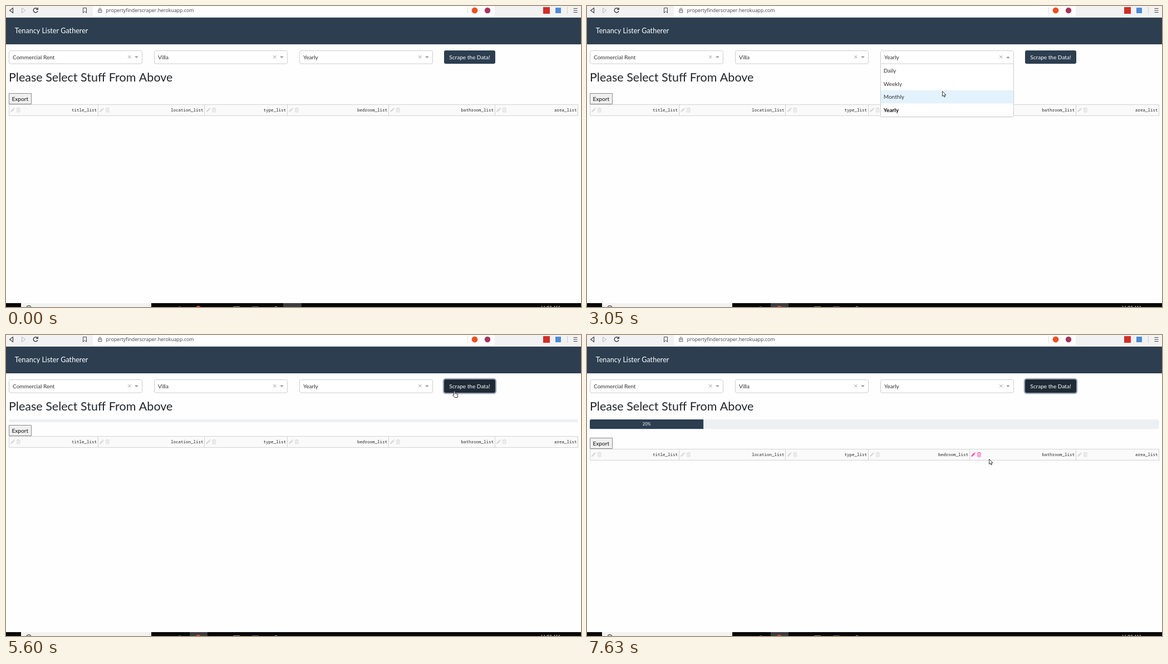
An HTML page with a canvas that plays this animation: 1033x542 px, repeating every 8 s.

```html
<!DOCTYPE html>
<html lang="en">
<head>
<meta charset="utf-8">
<title>Scraper demo</title>
<style>
html, body { margin: 0; width: 100%; height: 100%; overflow: hidden; background: #fefefe; }
canvas { display: block; }
</style>
</head>
<body>
<canvas id="stage" width="1033" height="542"></canvas>
<script>
const ctx = document.getElementById('stage').getContext('2d');
const LOOP = 8000;
const NAVY = '#2c3e50';
const lato = (size, weight = 400) => `${weight} ${size}px Lato, sans-serif`;
const MONO = '7.52px "Noto Sans Mono", monospace';

// Screen updates come in bursts: first time, last time, number of steps.
const BURSTS = [
  [170, 320, 3], [570, 710, 3], [870, 1020, 3], [1340, 2120, 11], [2500, 3270, 11],
  [3350, 4050, 10], [4280, 5050, 11], [5120, 5120, 1], [5600, 6370, 11], [7080, 7630, 8]
];
// Pointer path: time, x, y.
const PATH = [
  [170, 929, 428], [320, 899, 288], [500, 899, 288], [710, 888, 219], [800, 888, 219],
  [1020, 821, 178], [1260, 821, 178], [2120, 688, 99], [2500, 688, 99], [2600, 690, 92],
  [2700, 690, 92], [3050, 636, 155], [3270, 635, 160], [3600, 640, 178], [4200, 640, 178],
  [4510, 771, 132], [4820, 804, 101], [5830, 804, 101], [6370, 721.5, 223]
];
const FOCUS_WINDOW = 2500, MENU_OPEN = 2570, MENU_CLOSE = 3800, CLICK = 5000, GROW = 5600, FILL = 7040;

const COLUMNS = [
  [5, 165, 'title_list'], [165, 356.5, 'location_list'], [356.5, 505, 'type_list'],
  [505, 687, 'bedroom_list'], [687, 878, 'bathroom_list'], [878, 1027.5, 'area_list']
];
const OPTIONS = ['Daily', 'Weekly', 'Monthly', 'Yearly'];

const clamp = (v, lo, hi) => Math.min(hi, Math.max(lo, v));
const inside = (p, x, y, w, h) => p && p.x >= x && p.x < x + w && p.y >= y && p.y < y + h;

function quantise(t) {
  let q = 0;
  for (const [start, end, steps] of BURSTS) {
    if (t < start) break;
    const step = (end - start) / (steps - 1) || 1;
    q = Math.min(end, start + Math.floor((t - start + 4) / step) * step);
  }
  return q;
}

function pointerAt(t) {
  if (t < PATH[0][0]) return null;
  const i = PATH.findIndex(p => p[0] > t);
  if (i < 0) {
    const [, x, y] = PATH[PATH.length - 1];
    return { x, y };
  }
  const [t0, x0, y0] = PATH[i - 1], [t1, x1, y1] = PATH[i];
  const f = (t - t0) / (t1 - t0);
  return { x: x0 + (x1 - x0) * f, y: y0 + (y1 - y0) * f };
}

// CSS "ease": cubic-bezier(.25, .1, .25, 1)
function ease(x) {
  if (x <= 0) return 0;
  if (x >= 1) return 1;
  const bezier = (s, a, b) => 3 * a * s * (1 - s) ** 2 + 3 * b * s * s * (1 - s) + s ** 3;
  let lo = 0, hi = 1;
  for (let i = 0; i < 20; i++) {
    const mid = (lo + hi) / 2;
    if (bezier(mid, .25, .25) < x) lo = mid; else hi = mid;
  }
  return bezier(lo, .1, 1);
}

function rect(x, y, w, h, fill) {
  ctx.fillStyle = fill;
  ctx.fillRect(x, y, w, h);
}

function round(x, y, w, h, r, fill, stroke, width = 1) {
  ctx.beginPath();
  ctx.roundRect(x, y, w, h, r);
  if (fill) { ctx.fillStyle = fill; ctx.fill(); }
  if (stroke) { ctx.strokeStyle = stroke; ctx.lineWidth = width; ctx.stroke(); }
}

function text(str, x, y, font, fill, align = 'left') {
  ctx.font = font;
  ctx.fillStyle = fill;
  ctx.textAlign = align;
  ctx.fillText(str, x, y);
}

function disc(x, y, r, fill) {
  ctx.beginPath();
  ctx.arc(x, y, r, 0, 7);
  ctx.fillStyle = fill;
  ctx.fill();
}

function shape(d, x, y, fill, stroke, width = 1) {
  const path = new Path2D(d);
  ctx.save();
  ctx.translate(x, y);
  if (fill) { ctx.fillStyle = fill; ctx.fill(path); }
  if (stroke) { ctx.strokeStyle = stroke; ctx.lineWidth = width; ctx.stroke(path); }
  ctx.restore();
}

function browserBar() {
  rect(0, 0, 1033, 21, '#f2f2f2');
  rect(156, 0, 722, 18, '#fefefe');
  rect(0, 20, 1033, 1, '#d5d8da');
  shape('M12.5 3.5V12.5L6.5 8Z', 0, 0, null, '#333', 1.1);
  shape('M28.5 3.5V12.5L34.5 8Z', 0, 0, null, '#b5b5b5');
  shape('M56.3 5.2A4 4 0 1 0 57 9M57.3 3V6.3H54', 0, 0, null, '#333', 1.3);
  shape('M138.5 3.5H144.5V12.5L141.5 9.5L138.5 12.5Z', 0, 0, null, '#444');
  shape('M167 7V5.7A1.8 1.8 0 0 1 170.6 5.7V7M165.8 7.2H171.8V11.7H165.8ZM168.8 8.7V10', 0, 0, null, '#555');
  text('propertyfinderscraper.herokuapp.com', 179.6, 11.3, '8.8px "Open Sans", sans-serif', '#444');
  rect(829, 2, 1, 12, '#ddd');
  disc(842, 8, 5.4, '#ee4f22');
  disc(865, 8, 5.2, '#a5345d');
  rect(965, 2, 12, 12, '#d32d27');
  rect(987, 3, 10, 10, '#4c8bd8');
  rect(1008, 2, 1, 12, '#ccc');
  for (let i = 0; i < 3; i++) rect(1019.5, 4 + i * 3.5, 7, 1, '#444');
}

function taskbar(t) {
  rect(0, 535, 1033, 7, '#060707');
  rect(27, 535, 234, 7, '#f2f2f2');
  shape('M37 542A4.5 4.5 0 0 1 45 542', 0, 0, null, '#333', 1.2);
  if (t < FOCUS_WINDOW) rect(498, 535, 33, 7, '#3b3d3e');
  else rect(330, 535, 32, 7, '#3b3d3e');
  disc(312, 546, 5, '#4b7472');
  disc(345.5, 545, 5.2, '#d94b35');
  rect(408, 541, 12, 1, '#9b9a80');
  rect(442, 541, 12, 1, '#667');
  disc(485, 544, 3.2, '#8aa098');
  text('11:58 AM', 960.5, 545.2, '8px "Open Sans", sans-serif', '#eee');
}

function select(x, value, focused, open) {
  if (focused) round(x - .5, 79, 241, 26, 4, null, 'rgba(0,126,255,.2)', 3);
  round(x + .5, 80.5, 239, 23.5, open ? [3, 3, 0, 0] : 3, '#fff', focused ? '#1f8cff' : '#ccc');
  text(value, x + 7, 95.5, lato(10.09), '#333');
  shape('M-2.6 -2.6L2.6 2.6M2.6 -2.6L-2.6 2.6', x + 216.8, 91.7, null, '#999');
  shape(open ? 'M-3.4 2H3.4L0 -1.6Z' : 'M-3.4 -1.6H3.4L0 2Z', x + 229.4, 92, '#999');
}

function menu(pointer) {
  rect(526, 199.5, 241, 1.5, 'rgba(0,0,0,.05)');
  round(527.5, 104.5, 239, 95, [0, 0, 3, 3], '#fff', '#ccc');
  rect(528, 104, 238, 1, '#e6e6e6');
  const hovered = pointer.y < 104 ? 3 : clamp(Math.floor((pointer.y - 104) / 23.8), 0, 3);
  rect(528, 104 + hovered * 23.8, 238, 23.8, '#e4f2fe');
  OPTIONS.forEach((name, i) =>
    text(name, 532.7, 119.7 + i * 23.8, lato(10.09, i === 3 ? 700 : 400), i === 3 ? '#111' : '#333'));
}

function submitButton(hover, clicked) {
  if (clicked) round(786, 79, 94, 26, 4, null, '#9aa4ae', 2.4);
  round(787, 80, 92, 24, 3, clicked || hover ? '#1e2b37' : NAVY);
  text('Scrape the Data!', 833, 95.9, lato(10.09), '#fff', 'center');
}

function headerIcons(x, y, active) {
  const color = active ? '#ff4cac' : '#d8d8d8';
  shape('M-4 4L-3.3 1.4L1.4 -3.3L3.3 -1.4L-1.4 3.3ZM2 -3.8L2.8 -4.4L4.4 -2.8L3.8 -2Z', x + 7, y, color);
  shape('M-3.5 -2.6H3.5M-1.3 -2.8V-3.8H1.3V-2.8M-2.6 -2.4V3.8H2.6V-2.4M-.9 -1V2.5M.9 -1V2.5',
    x + 17.3, y, null, color, .9);
}

function table(shift, pointer) {
  const top = 177 + shift;
  round(5.5, 157.5 + shift, 40, 19, 0, '#f0f0f0', '#8a8a8a');
  text('Export', 25.3, 170.9 + shift, lato(10.2), '#111', 'center');
  rect(5, top, 1023, 21, '#fafafa');
  ctx.strokeStyle = '#d3d3d3';
  ctx.lineWidth = 1;
  ctx.strokeRect(5.5, top + .5, 1022, 20);
  for (const [left, right, name] of COLUMNS) {
    if (left > 5) rect(Math.floor(left), top, 1, 21, '#d3d3d3');
    headerIcons(left, top + 10.3, inside(pointer, left, top, right - left, 21));
    text(name, right - 2, top + 13, MONO, '#222', 'right');
  }
}

function progress(height, t) {
  ctx.save();
  ctx.beginPath();
  ctx.roundRect(5, 152, 1022.5, height, Math.min(2.7, height / 2));
  ctx.clip();
  rect(5, 152, 1023, height, '#ecf0f1');
  const width = 204.4 * ease((t - FILL) / 600);
  if (width > 0) {
    ctx.beginPath();
    ctx.rect(5, 152, width, height);
    ctx.clip();
    rect(5, 152, width, height, NAVY);
    text('20%', 5 + width / 2, 163.4, lato(7.57), '#fff', 'center');
  }
  ctx.restore();
}

function drawPointer({ x, y }, kind) {
  x = Math.round(x);
  y = Math.round(y);
  if (kind === 'text') {
    shape('M-2.5 -4.5H-.5M.5 -4.5H2.5M0 -4V4M-2.5 4.5H-.5M.5 4.5H2.5', x + .5, y + .5, null, '#333');
  } else if (kind === 'hand') {
    shape('M.7 1.2Q1.8 -.2 2.8 1.2V4.4L7 5.4Q8 5.8 7.8 7.2L7 11.5H2L-1.2 7.6Q-1 6.2 .7 7Z',
      x, y, '#fff', '#222', .9);
  } else {
    shape('M.5 .5V9.6L2.6 7.7L4 11L5.5 10.3L4.2 7.2H7Z', x, y, '#fff', '#222', .9);
  }
}

function draw(time) {
  const t = quantise(time);
  const pointer = pointerAt(t);
  const open = t >= MENU_OPEN && t < MENU_CLOSE;
  const clicked = t >= CLICK;
  const onButton = inside(pointer, 787, 80, 92, 24);
  const onSelect = t >= FOCUS_WINDOW && inside(pointer, 527, 80, 240, 24);
  const growth = t < GROW ? 0 : Math.min(28, 5 + (t - GROW) * .0965);

  rect(0, 0, 1033, 542, '#fefefe');
  browserBar();
  rect(0, 21, 1033, 48, NAVY);
  text('Tenancy Lister Gatherer', 15.8, 49.3, lato(12.6), '#fff');
  select(5, 'Commercial Rent');
  select(266, 'Villa');
  select(527, 'Yearly', t >= MENU_CLOSE && !clicked, open);
  submitButton(onButton, clicked);
  text('Please Select Stuff From Above', 5, 136, lato(21.52), '#212529');
  if (growth) progress(Math.min(17.5, growth), t);
  table(Math.round(growth), open ? null : pointer);
  if (open) menu(pointer);
  taskbar(t);
  if (pointer) drawPointer(pointer, onButton ? 'hand' : onSelect ? 'text' : 'arrow');
}

function frame(now) {
  draw(now % LOOP);
  requestAnimationFrame(frame);
}
requestAnimationFrame(frame);
</script>
</body>
</html>
```
